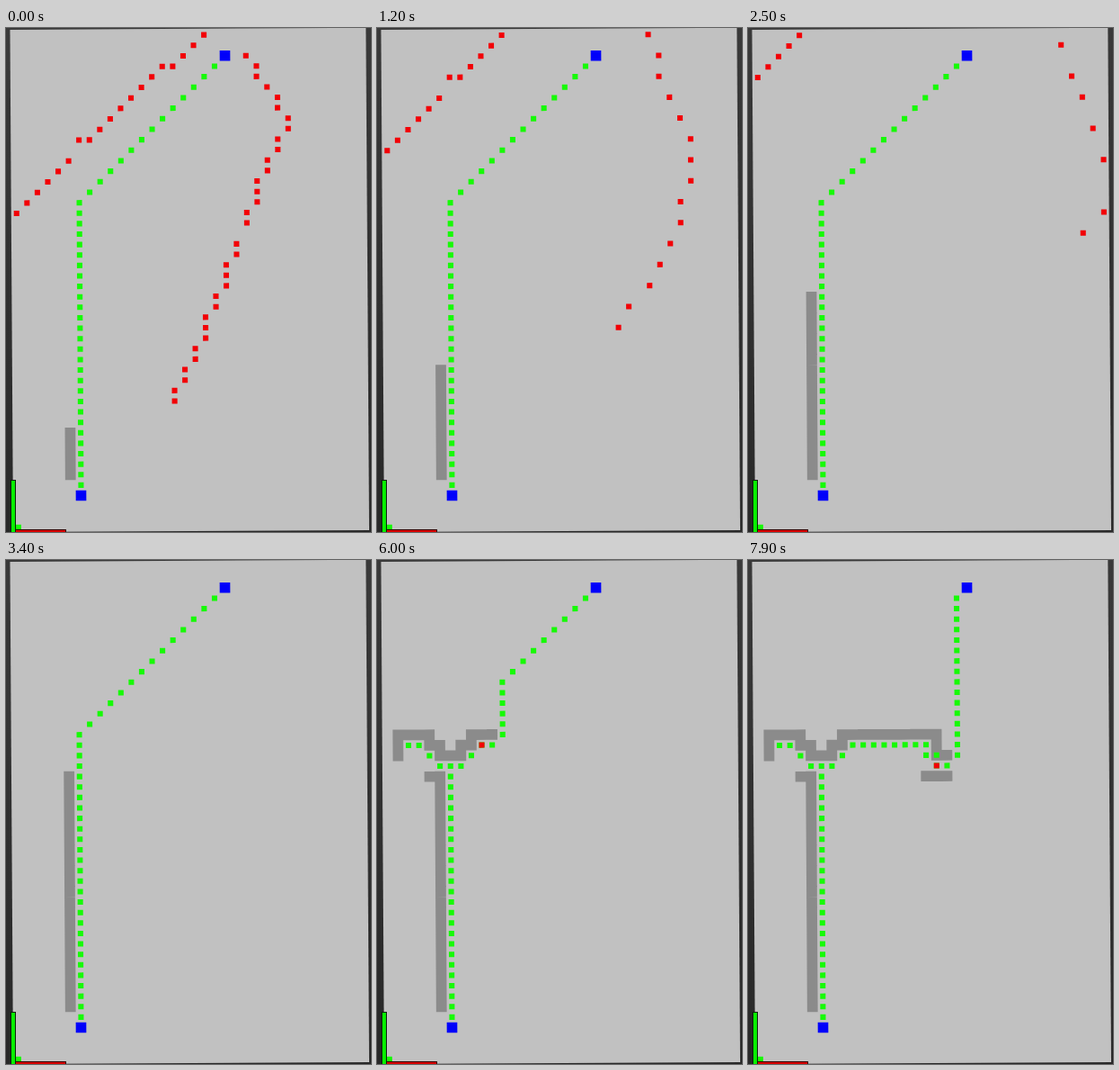
Animation, 406 px wide and 560 px high, one loop 8000 ms. Source, as an HTML page:

```html
<!DOCTYPE html>
<html lang="en">
<head>
<meta charset="utf-8">
<title>Grid replanning</title>
<style>
  html, body { margin: 0; width: 100%; height: 100%; overflow: hidden; background: #303030; }
  svg { display: block; }
</style>
</head>
<body>
<svg width="406" height="560" viewBox="0 0 406 560">
  <defs>
    <linearGradient id="dark" x1="0" y1="0" x2="0" y2="1">
      <stop offset="0" stop-color="#393939"/>
      <stop offset="1" stop-color="#282828"/>
    </linearGradient>
  </defs>
  <rect width="406" height="560" fill="url(#dark)"/>
  <path d="M4.5 2L400.3 -.2L404 558L8 560Z" fill="#c1c1c1"/>
  <!-- one unit is one grid cell, rows count upwards from the start -->
  <g transform="matrix(11.64 -.05 -.07 -11.62 83.5 519.5)">
    <path id="walls" fill="#8b8b8b"/>
    <path id="route" fill="#16fa06"/>
    <path id="open" fill="#f20006"/>
    <path id="ends" fill="#0000fa"/>
  </g>
  <rect x="10" y="557" width="57" height="3" fill="#300"/>
  <rect x="10" y="558" width="56" height="2" fill="#d80000"/>
  <rect x="5" y="502" width="6" height="58" fill="#0a200a"/>
  <rect x="6" y="503" width="4" height="57" fill="#08f000"/>
</svg>
<script>
const LOOP = 8000;
const START = [0, 0], GOAL = [14, 42];
const TOP = 44, LEFT = -6, RIGHT = 27;

const lerp = (a, b, u) => a + (b - a) * u;
const el = id => document.getElementById(id);

function draw(id, cells, size) {
  const h = size / 2;
  el(id).setAttribute('d', cells.map(([c, r]) =>
    `M${c - h} ${r - h}h${size}v${size}h${-size}z`).join(''));
}

// All cells along straight or diagonal legs
function legs(...points) {
  const out = [points[0]];
  for (let i = 1; i < points.length; i++) {
    const [c0, r0] = points[i - 1], [c1, r1] = points[i];
    const n = Math.max(Math.abs(c1 - c0), Math.abs(r1 - r0));
    for (let k = 1; k <= n; k++)
      out.push([Math.round(lerp(c0, c1, k / n)), Math.round(lerp(r0, r1, k / n))]);
  }
  return out;
}

const hidden = [
  legs([-1, 2], [-1, 24], [-2, 24]),
  legs([-5, 26], [-5, 28], [-2, 28]),
  legs([-2, 27], [-1, 27]),
  legs([-1, 26], [1, 26]),
  legs([1, 27], [2, 27]),
  legs([2, 28], [11, 28], [11, 26], [12, 26]),
  legs([10, 24], [12, 24])
].flat();

// The robot's whole walk; DONE cells lie behind it when the loop begins
const DONE = 5;
const trail = legs(START, [0, 25], [-1, 25], [-3, 27], [-4, 27], [-3, 27], [-1, 25],
  [1, 25], [3, 27], [10, 27], [10, 26], [11, 25]);
const LAST = trail.length - 1 - DONE;

// Walls become known once the robot stands next to them
const sees = ([c, r], [x, y]) => Math.abs(c - x) < 2 && Math.abs(r - y) < 2;

// Up one column, then diagonally to the goal
const climb = (c, r) => [[c, r], [c, c + 28], GOAL];

function plan(s, bot) {
  const c = bot[0];
  if (s < 20) return legs(bot, ...climb(0, 28));
  if (s < 24) {                       // round the left tip of the wall
    const k = Math.max(1, s - 20);
    return legs(bot, [-1 - k, 24 + k], [-2 - k, 25 + k], [2 - 2 * k, 29], [1, 29], GOAL);
  }
  if (s < 31) {                       // back and round its right tip
    const col = s < 30 ? 2 : 3;
    return legs(...trail.slice(DONE + s, DONE + col + 29), ...climb(col, col + 24));
  }
  if (s < 38) return legs(bot, [c + 1, 27], ...climb(c + 2, 28));
  return legs(bot, [c, 26], [c + 1, 25], ...climb(c + 2, 26));
}

// Search front on the right: two legs meeting at a tip, thinning out as it moves
function rightArm(s) {
  const low = 9 + 1.2 * s, high = 42 + s / 4;
  const tip = [20 + 0.6 * s, 30 + 6 * Math.exp(-s / 3)];
  const n = Math.round(33 / (1 + s / 5));
  const out = [];
  for (let i = 0; i < n; i++) {
    const r = lerp(low, high, i / (n - 1));
    const u = (r - low) / (tip[1] - low), v = (r - tip[1]) / (high - tip[1]);
    const c = u < 1 ? lerp(low, tip[0], u) + 0.3 * s * u * (1 - u)
                    : lerp(tip[0], 16 + s / 2, v);
    out.push([Math.round(c), Math.round(r)]);
  }
  return out.filter(([c, r]) => c <= RIGHT && r <= TOP);
}

// Search front on the left: a diagonal that climbs one row per step
function leftArm(s) {
  const out = [];
  for (let c = LEFT; c <= 12; c++) {
    const r = c + 33 + (c === 0) - (c > 8) + s;
    if (r <= TOP) out.push([c, r]);
  }
  return out;
}

// Search that floods the dead end on the left
function pocket(s) {
  const out = [], reach = 2 * (s - 20);
  for (let r = s > 23 ? 20 : 21; r <= 27; r++) {
    const end = r > 23 ? Math.min(-1, 24 - r) : -2;
    for (let c = Math.max(LEFT, r - 32); c <= end; c++)
      if (Math.max(Math.abs(c + 1), Math.abs(r - 25)) <= reach) out.push([c, r]);
  }
  return out;
}

function openCells(s, bot) {
  if (s < 18) return [...leftArm(s), ...rightArm(s)];
  if (s < 21) return [];
  return s < 30 ? pocket(s) : [bot];
}

let shown = -1;
function render(ms) {
  const t = Math.floor((ms % LOOP) / 100) * 100;
  const s = Math.min(LAST, Math.floor(t / 196 + 0.85));
  if (s === shown) return;
  shown = s;
  const past = trail.slice(0, DONE + s + 1), bot = past[past.length - 1];
  draw('walls', hidden.filter(w => past.some(p => sees(p, w))), 1.01);
  draw('route', [[-6, -3], ...past, ...plan(s, bot)], 0.52);
  draw('open', openCells(s, bot), 0.52);
}

draw('ends', [START, GOAL], 1);
const t0 = performance.now();
function tick() {
  render(performance.now() - t0);
  requestAnimationFrame(tick);
}
tick();
</script>
</body>
</html>
```
